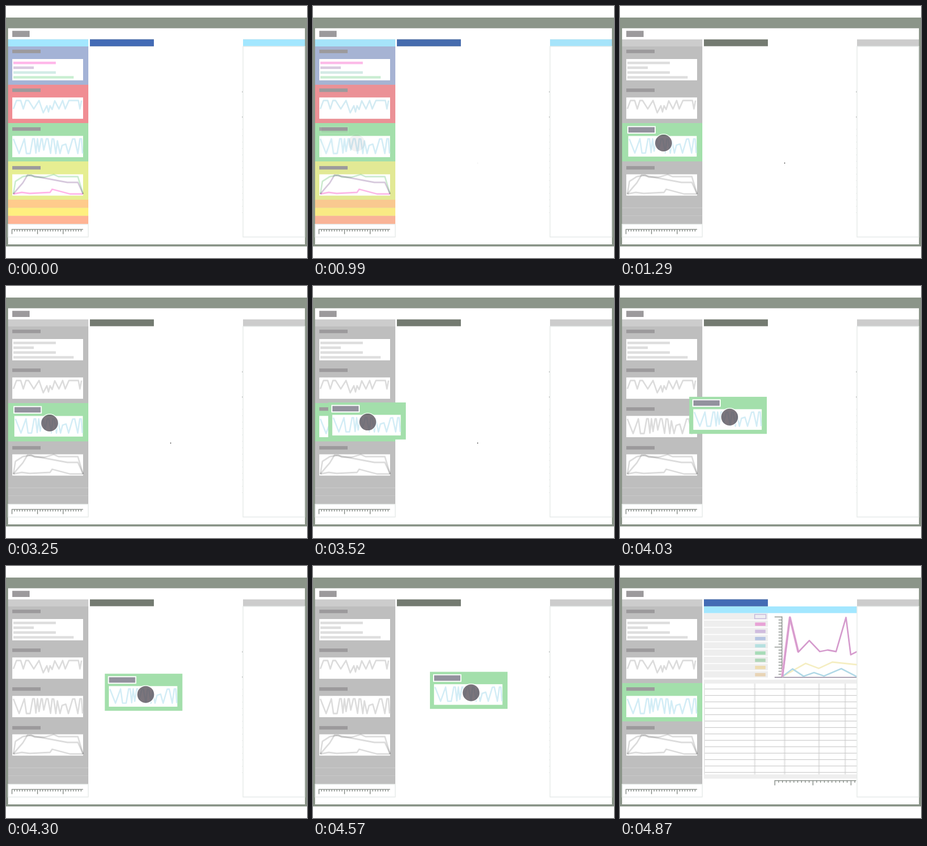
Animation of 574 by 480 pixels, one loop 7770 ms. Source, as an HTML page:

```html
<!DOCTYPE html>
<html lang="en">
<head>
<meta charset="utf-8">
<title>Dashboard drag and drop</title>
<style>
  html, body { margin: 0; width: 100%; height: 100%; overflow: hidden; background: #fff; }
  svg { display: block; width: 574px; height: 480px; }
  polyline { fill: none; stroke-width: 2.8; stroke-linejoin: round; }
  .ruler { fill: none; stroke: #8b918c; stroke-width: 1.6; }
  .border { fill: none; stroke: #e8ecea; stroke-width: 1.6; }
  #colour { isolation: isolate; }
  .area { mix-blend-mode: multiply; }
</style>
</head>
<body>
<svg id="stage" viewBox="0 0 574 480"></svg>
<script>
const LOOP = 7770, TICK = 30;
const GREY = '#9c9a9c', STRIPE = '#eeeeee';

const rect = (x, y, w, h, fill, extra = '') =>
  `<rect x="${x}" y="${y}" width="${w}" height="${h}" fill="${fill}" ${extra}/>`;
const line = (points, stroke, extra = '') =>
  `<polyline points="${points}" stroke="${stroke}" ${extra}/>`;
const path = (d, attrs) => `<path d="${d}" ${attrs}/>`;
const group = (id, content) => `<g id="${id}">${content}</g>`;
const place = (transform, content) => `<g transform="${transform}">${content}</g>`;
const range = (n, fn) => Array.from({ length: n }, (_, i) => fn(i)).join('');

const bump = (x, centre, width) => Math.exp(-(((x - centre) / width) ** 2));

// Alternates between two curves at the given turning points; "a-b" holds a flat stretch.
const zigzag = (turns, ...curves) => turns.split(' ').flatMap((turn, i) =>
  turn.split('-').map(x => `${x},${curves[i % 2](x)}`)).join(' ');

const calmWave = zigzag('14 20-28 33 38-43 53 63 71 78 81 84 88 93 101 108 113 120-138 141 144',
  x => 196 + 9 * bump(x, 75, 9), x => 180 + 12 * bump(x, 81, 7));
const busyWave = zigzag('14 25 35 39-46 51-54 57 60 63 67-69 72 77-80 85 88-91 95 98 103 107-114 119 127-131 137 141-144 146',
  x => 253 + 13 * bump(x, 109, 10), x => 281 - 7 * bump(x, 70, 9));
const areas = [
  '14,358 18,334 32,325 48,322 55,326 74,326 91,321 100,325 137,325 147,358',
  '14,358 25,345 32,337 41,322 53,324 117,336 137,336 147,358',
  '14,358 30,355 45,357 84,355 88,349 122,358 147,358'
];

const vivid = {
  head: '#a3e7ff', tab: '#436bb5', wave: '#d3edf6',
  rows: ['#a4b3d6', '#f08d93', '#a3dfab', '#e6ee92', '#ffcb8c', '#ffef7f', '#ffb494'],
  bars: ['#ffb8ea', '#d9c9e0', '#d2ece6', '#c9efd1'],
  areas: ['#cbeccf', '#d6c8dc', '#ffb5e8']
};
const muted = {
  head: '#cccccc', tab: '#747b71', wave: '#dcdcdc',
  rows: Array(7).fill('#bebebe'),
  bars: Array(4).fill('#dedede'),
  areas: Array(3).fill('#dcdcdc')
};

const plot = i => rect(12, 101 + i * 73.2, 135, 40.6, '#fff');
const label = i => rect(12, 83.2 + i * 73.9, 54, 6.6, GREY);
const rowTop = i => i < 4 ? 77 + i * 73 : 369 + (i - 4) * 15.4;
const tab = c => rect(160, 63.6, 122, 13, c.tab);

const wavePanel = c => rect(4, 223, 153, 73, c.rows[2]) + plot(2) + line(busyWave, c.wave);

const panels = c =>
  rect(4, 63.6, 153, 13.4, c.head) + rect(452, 63.6, 118, 13.4, c.head) +
  c.rows.map((fill, i) => rect(4, rowTop(i), 153, rowTop(i + 1) - rowTop(i), fill)).join('') +
  plot(0) + [81, 39, 81, 115].map((w, i) => rect(14, 106 + i * 9.15, w, 4.8, c.bars[i])).join('') +
  plot(1) + line(calmWave, c.wave) +
  plot(3) + areas.map((p, i) => line(p, c.areas[i], 'class="area"')).join('');

// Ruler along x from the origin with a long tick every tenth step.
const ruler = (length, step, short, long) => path(`M-.8 0H${length}` +
  range(Math.floor(length / step) + 1, i => `M${i * step} 0v${i % 10 ? short : long}`), 'class="ruler"');

const rowLine = i => 234.3 + i * 12.22;

function results() {
  const swatches = ['#e8a3d6', '#d0bcde', '#b5c4e2', '#b5e0e0', '#a8dcb8', '#b0d6b8', '#eedcb0', '#e8d4b6'];
  const list = range(9, i => rect(160, 90 + i * 13.8, 122, 12, STRIPE)) +
    rect(256.8, 92.3, 21.5, 8, '#efeef2', 'stroke="#c6badb" stroke-width="1.6"') +
    swatches.map((c, i) => rect(257.5, 107.6 + i * 13.75, 20, 6.4, c)).join('');
  const chart = place('translate(308.8 212) rotate(-90) scale(1 -1)', ruler(116, 5.75, 6.5, 14)) +
    rect(295, 211.2, 157, 1.8, '#a095a8') +
    line('309,211 354,185.5 379,195 405,183 452,188', '#f5eec2') +
    line('309,211 329,196 350,210 370,203 389,209.5 422,195.5 452,211', '#b0d8e6') +
    line('309,211 324,98 340,164', '#ecb4dc', 'style="stroke-width:4.5"') +
    line('310,211 324,98 340,164 361,142 381,163 396,160 412,163 431,98 440,169 452,163', '#d59bcd');
  const columns = [257, 314, 379.5, 429.5].map(x => rect(x - 1.6, 224, 3.2, 173, '#e9e9e9')).join('');
  const rows = range(14, i => rect(161, rowLine(i) - .6, 291, 1.2, '#c9c9c9'));
  return rect(160, 77, 292, 363, '#fff') + rect(160, 77, 292, 12.7, vivid.head) + list + chart +
    rect(160, 216.5, 292, 7.5, STRIPE) + columns + rows +
    rect(160, 224, 1.8, 173, '#e4e4e4') + rect(160, 397, 292, 8, STRIPE) +
    place('translate(295.3 408.8)', ruler(155, 7.26, 4, 9));
}

const card = place('translate(8 224) scale(.967) translate(-4 -223)', wavePanel(vivid)) +
  rect(14, 228.7, 54, 14.4, '#fff') + rect(16, 230.7, 50, 10.4, '#93929e');
const pointer = '<circle cx="83" cy="261" r="16.8" fill="none" stroke="#fff" stroke-opacity=".75" stroke-width="1.8"/>' +
  '<circle cx="83" cy="261" r="16" fill="#5a535c" fill-opacity=".8"/>';

document.getElementById('stage').innerHTML =
  rect(0, 22, 574, 436, '#8b9589') + rect(4, 42.4, 566, 411.6, '#fff') +
  rect(12, 47.3, 33, 11.7, GREY) +
  panels(muted) + wavePanel(muted) + tab(muted) +
  group('colour', panels(vivid)) +
  group('green', wavePanel(vivid)) +
  group('tab', tab(vivid)) +
  range(4, label) +
  rect(4.3, 415.8, 152.5, 24.2, '#fff', 'class="border"') +
  place('translate(11.4 425.5)', ruler(135.6, 4.88, 4, 9)) +
  range(14, i => rect(450, rowLine(i), 2, 1, '#e4e7e5')) +
  range(2, i => rect(450, 162 + i * 48, 2, 3, '#c4c8c6')) +
  group('dot', rect(313, 298.5, 2, 1.4, '#444')) +
  group('results', results()) +
  rect(452, 77, 117.6, 363, 'none', 'class="border"') +
  group('card', card) + group('pointer', pointer);

const el = {};
for (const id of ['colour', 'green', 'tab', 'dot', 'results', 'card', 'pointer']) {
  el[id] = document.getElementById(id);
}

// Progress 0..1 advancing in whole ticks, which CSS easing cannot combine with the sine curve.
const progress = (t, start, span) =>
  Math.min(1, Math.max(0, Math.floor((t - start) / TICK) * TICK / span));
const move = (node, k, dx, dy) => node.setAttribute('transform', `translate(${dx * k} ${dy * k})`);
const fade = (node, k) => { node.style.opacity = k; };

function draw(now) {
  const t = now % LOOP;
  const lift = progress(t, 960, 330);
  const drag = (1 - Math.cos(Math.PI * progress(t, 3220, 1500))) / 2;
  const leave = progress(t, 3730, 300);
  const drop = progress(t, 4720, 150);

  fade(el.colour, 1 - lift);
  fade(el.tab, Math.max(1 - lift, drop));
  fade(el.green, Math.max(1 - leave, drop));
  fade(el.dot, lift * (1 - leave));
  fade(el.results, drop);
  fade(el.card, lift * (1 - drop));
  fade(el.pointer, lift * (1 - drop));
  move(el.card, drag, 220.4, -23);
  move(el.pointer, drag, 224, -20);
  requestAnimationFrame(draw);
}
draw(performance.now());
</script>
</body>
</html>
```
